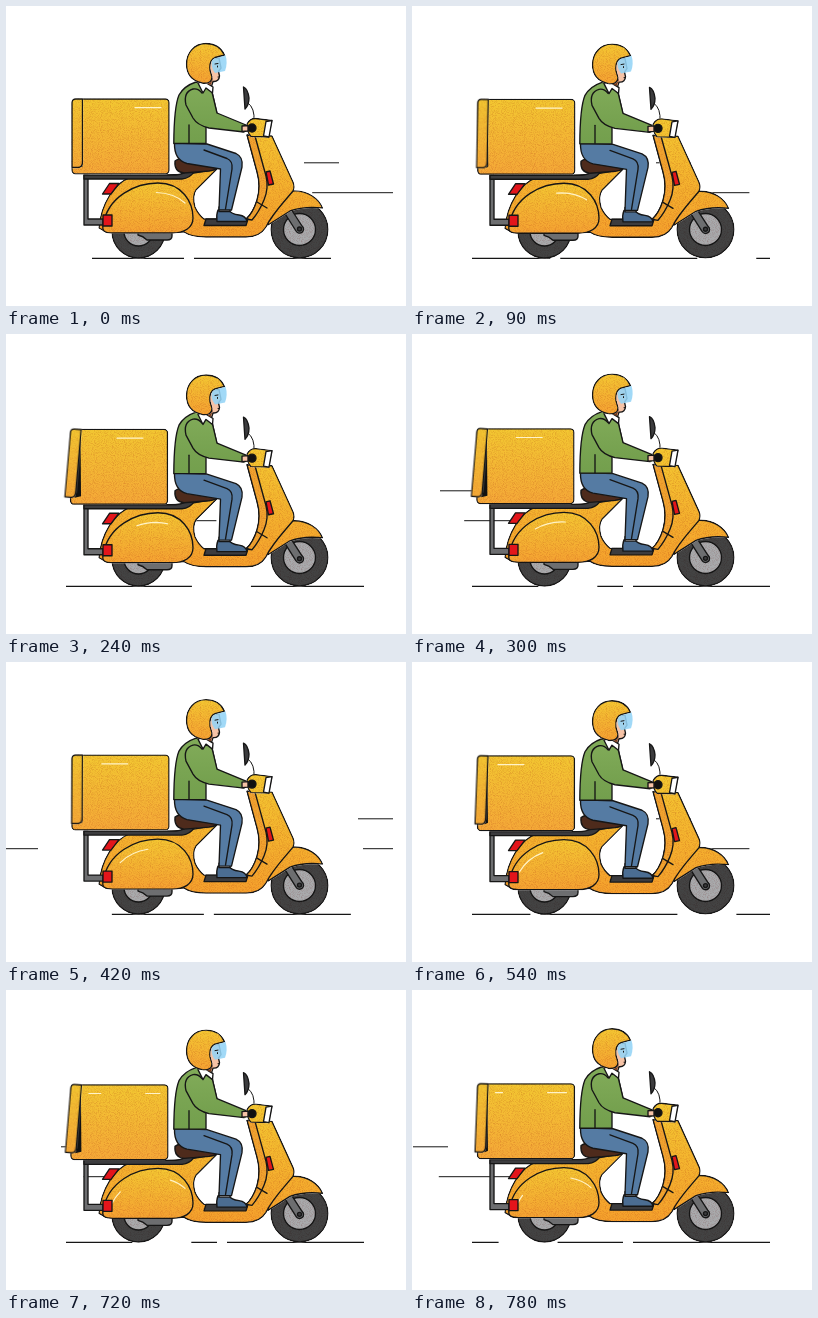
An HTML page for the animation above (810 ms loop, 400 by 300 pixels).

```html
<!DOCTYPE html>
<html lang="en">
<head>
<meta charset="utf-8">
<title>Delivery scooter</title>
<style>
  html, body { margin: 0; width: 100%; height: 100%; overflow: hidden; background: #fff; }
  svg { display: block; width: 100vw; height: 100vh; }
  .ink { fill: none; stroke: #161616; stroke-width: 1.35; stroke-linejoin: round; stroke-linecap: round; }
  .thin { stroke-width: 1; }
  .road { stroke-linecap: butt; }
  .shine { fill: none; stroke: #fff3c8; stroke-width: 1.2; stroke-dasharray: 26 45; }
  .body { fill: url(#bodyFill); }
  .case { fill: url(#caseFill); }
  .side { fill: #f2a42f; }
  .metal { fill: #6d6e70; }
  .hub { fill: #a9aaac; }
  .tyre { fill: #434343; }
  .dark { fill: #3c3c3e; }
  .black { fill: #111; }
  .red { fill: #e3151b; }
  .white { fill: #fff; }
  .green { fill: url(#coatFill); }
  .jeans { fill: #557ba3; }
  .shoe { fill: #4b6d92; }
  .skin { fill: #f6c3a6; }
  .seat { fill: #4e2b1c; }
</style>
</head>
<body>
<svg viewBox="0 0 400 300">
  <defs>
    <linearGradient id="bodyFill" gradientUnits="userSpaceOnUse" x1="0" y1="112" x2="0" y2="231">
      <stop offset="0" stop-color="#f5c931"/><stop offset="1" stop-color="#f6a02c"/>
    </linearGradient>
    <linearGradient id="cowlFill" x1="0" y1="0" x2="0" y2="1">
      <stop offset="0" stop-color="#f5c732"/><stop offset="1" stop-color="#f6a232"/>
    </linearGradient>
    <linearGradient id="caseFill" gradientUnits="userSpaceOnUse" x1="0" y1="93" x2="0" y2="168">
      <stop offset="0" stop-color="#f4c731"/><stop offset="1" stop-color="#f6a838"/>
    </linearGradient>
    <linearGradient id="coatFill" x1="0" y1="0" x2="0" y2="1">
      <stop offset="0" stop-color="#80aa58"/><stop offset="1" stop-color="#739f4d"/>
    </linearGradient>
    <filter id="grain" x="-10%" y="-10%" width="120%" height="120%" color-interpolation-filters="sRGB">
      <feTurbulence type="fractalNoise" baseFrequency="1.1" numOctaves="1" seed="4"/>
      <feColorMatrix values=".2 0 0 0 .88  .5 0 0 0 .72  .5 0 0 0 .72  0 0 0 0 1"/>
      <feBlend in2="SourceGraphic" mode="multiply"/>
      <feComposite in2="SourceGraphic" operator="in"/>
    </filter>
  </defs>

  <path id="wind" class="ink thin road"/>
  <path id="road" class="ink road"/>

  <g class="ink" filter="url(#grain)">
    <circle class="tyre" cx="132.500" cy="225.500" r="26.500"/>
    <circle class="hub" cx="132.500" cy="225.500" r="14.500"/>
    <circle class="tyre" cx="293.500" cy="223.500" r="28.400"/>
    <circle class="hub" cx="293.500" cy="223.500" r="16"/>
  </g>

  <g id="chassis" class="ink">
    <path class="metal" d="M132 225H166V230Q166 234 161 234H141Q137 230 132 229Z"/>
    <path class="metal" d="M278 206L285 203L296 220A4 4 0 1 1 290 225Z"/>
    <circle class="dark" cx="293.500" cy="223" r="2"/>

    <g filter="url(#grain)">
      <path class="body" d="M286 185C302 184 313 193 316.500 202Q298 200 284 205L262 219V204Z"/>
      <path class="body" d="M241 129L251 166Q255 180 251 194Q247 207 240 213H198Q192 208 189 201Q186 190 190 184L211 163L182 168L125 171C108 177 95 198 93 222L100 226H178C184 230 190 231 200 231H240Q254 231 260 221C266 208 278 196 287 185Q289 181 287 176L266 130Z"/>
      <path class="side" d="M241 129L251 166Q255 180 251 194Q247 207 240 213L246 214Q253 206 258 194Q263 182 260 170L249 130Z"/>
      <path d="M251 196L261 202"/>
      <path d="M97 219C102 190 130 177 152 177C176 177 187 196 187 212C187 222 178 227 166 227H107C98 227 96 225 97 219Z" fill="url(#cowlFill)"/>
    </g>
    <path id="cowlShine" class="shine" pathLength="71" d="M106 212C114 196 130 187 150 186.500Q168 187 179 197"/>
    <path class="dark" d="M200 213H242L240 219.500H198Z"/>

    <path class="metal" d="M78 169H82V213H97V219H78Z"/>
    <path class="dark" d="M78 169H170Q178 168 182 164L188 166Q184 172 176 173H78Z"/>
    <path class="red" d="M97 209H106V220H97Z"/>
    <path class="red" d="M96.500 188L103.500 177.500H113L105 188Z"/>
    <path class="red" d="M260 166L264 165L267.500 178L262.500 179Z"/>
    <path class="seat" d="M169 155Q176 150 190 153L213 160Q211 164 203 165L178 167Q168 166 169 155Z"/>
  </g>

  <g id="cargo" class="ink">
    <g filter="url(#grain)">
      <rect class="case" x="66" y="93" width="97" height="74.800" rx="3.500"/>
    </g>
    <path id="gap" class="black" stroke="none"/>
    <g id="flap">
      <path class="case" filter="url(#grain)" d="M76.500 93H69.500Q66 93 66 97V161.500H72Q76.500 161.500 76.500 156Z"/>
    </g>
    <path id="caseShine" class="shine" pathLength="71" d="M84 101.700H155"/>
  </g>

  <g id="rider" class="ink">
    <path class="shoe" d="M212 204H223Q225 208 233 209Q240 210 241 215.500H211Q210 209 212 204Z"/>
    <path class="white" d="M213 201H224V205.500H213Z"/>
    <path class="jeans" d="M168.500 137L201 138L230 147.500Q237.500 151 236 161L225.500 204H213L214.500 163L181 157.500Q168 154 168.500 137Z"/>
    <path d="M198 144L221 152.500Q227 155 226 163L219.500 203"/>
    <path class="green" d="M190 76Q178 80 173 89Q168 101 167.800 137.500H200V112L211 108L206 86L199 78Z"/>
    <path d="M183 119V137"/>
    <path class="green" stroke="none" d="M180 99Q177 84 189 83L206 86L211 107L240 119V126L203 122Q191 119 187 112Z"/>
    <path d="M196 87Q192 82 187 83Q177 86 180 99L187 112Q191 119 203 122L238 126M206 86L211 107L240 119"/>
    <g id="head">
      <path class="skin" d="M205 52H213L215 62L212.500 65.500L213.500 70Q213 76 207 75.500L205 82L196 79V70Z"/>
      <path class="white" d="M192 77L197 75L207 81L206.500 87L200 82L197 87Z"/>
      <path d="M206 73L204 78L201 76" stroke="#7a3d1e" stroke-width="2"/>
      <path d="M206 52L219.500 49Q222 57 219 65L209 67Q204 61 206 52Z" fill="#94d4f6" fill-opacity=".88" stroke="none"/>
      <path class="thin" d="M209 58L212 57.500M211.500 60V61M212 71H213"/>
      <path filter="url(#grain)" d="M218.500 49C215 41 208 37.500 200 37.500C188 37.500 180.500 47 180.500 58C180.500 69 187 75 196 77C202 78 206 76 206 71L204 64Q203 54 209 51.500Z" fill="url(#cowlFill)"/>
    </g>
  </g>

  <g id="bars" class="ink">
    <path class="thin" d="M242 97Q249 102 248 115"/>
    <path class="dark" d="M237.500 81Q242 83 243 92Q243 99 239 103Z"/>
    <path class="body" filter="url(#grain)" d="M241 118Q244 112 250 112.500L266 114.500L262.500 131L245 130.500Q241 127 241 118Z"/>
    <path class="white" d="M260 115.500L266 114.500L263 131L257.500 130Z"/>
    <circle class="black" cx="246" cy="122" r="4"/>
    <path class="skin" d="M236 120L242 119.500V125L236 125.500Z"/>
  </g>
</svg>
<script>
  const $ = id => document.getElementById(id);
  const LOOP = 810, TICK = 30, ROAD = 298;
  const mod = (a, n) => ((a % n) + n) % n;
  const move = (id, x, y) => $(id).setAttribute('transform', `translate(${x} ${y})`);

  // Horizontal stroke from a to b, kept between lo and hi
  const dash = (a, b, y, lo, hi) => {
    a = Math.max(a, lo);
    b = Math.min(b, hi);
    return b > a ? `M${a} ${y}H${b}` : '';
  };

  // The pose rate is a little faster than the tick rate, so one pose in ten is skipped
  const poseAt = t => {
    const k = Math.floor(t / TICK) - 1;
    return k < 0 ? 0 : k + Math.floor(k / 9);
  };

  // The old road slides left and uncovers a still one behind its trailing gap
  function road(s) {
    const m = mod(33 + 19.867 * s, ROAD), edge = 417 - m, y = 252.3;
    return dash(119 - m, 211 - m, y, 60, 358) + dash(221 - m, 358 - m, y, 60, 358) +
      dash(60, 211, y, edge, 358) + dash(221, 358, y, edge, 358);
  }

  function wind(s) {
    const p = (s + 2) % 16, a = 352 - 27 * p, b = 357 - 25.4 * p;
    return dash(a, a + 35, 156.8, 0, 387) + dash(b, b + 82, 186.7, 0, 387) +
      dash(b - 407, b - 325, 186.7, 0, 387);
  }

  function draw(s) {
    const dip = (1 - Math.cos(2 * Math.PI * s / 15)) / 2;
    const open = 5 * Math.min(1, 1.3 * dip);

    $('road').setAttribute('d', road(s));
    $('wind').setAttribute('d', wind(s));

    move('chassis', 0, 1.8 * dip);
    move('bars', 0, 2.2 * dip);
    move('rider', 0, 2.2 * dip);
    move('head', 0, 1.3 * dip);
    move('cargo', -1.5 * dip, 2.4 * dip);

    $('flap').setAttribute('transform', `rotate(${open} 74 95)`);
    $('gap').setAttribute('d', `M76 96L76.500 160L${76 - 1.15 * open} 161.500Z`);

    for (const id of ['caseShine', 'cowlShine']) {
      $(id).style.strokeDashoffset = s * 71 / 30 - 45;
    }
  }

  const start = performance.now();
  function loop(now) {
    draw(poseAt(mod(now - start, LOOP)));
    requestAnimationFrame(loop);
  }
  draw(0);
  requestAnimationFrame(loop);
</script>
</body>
</html>
```
